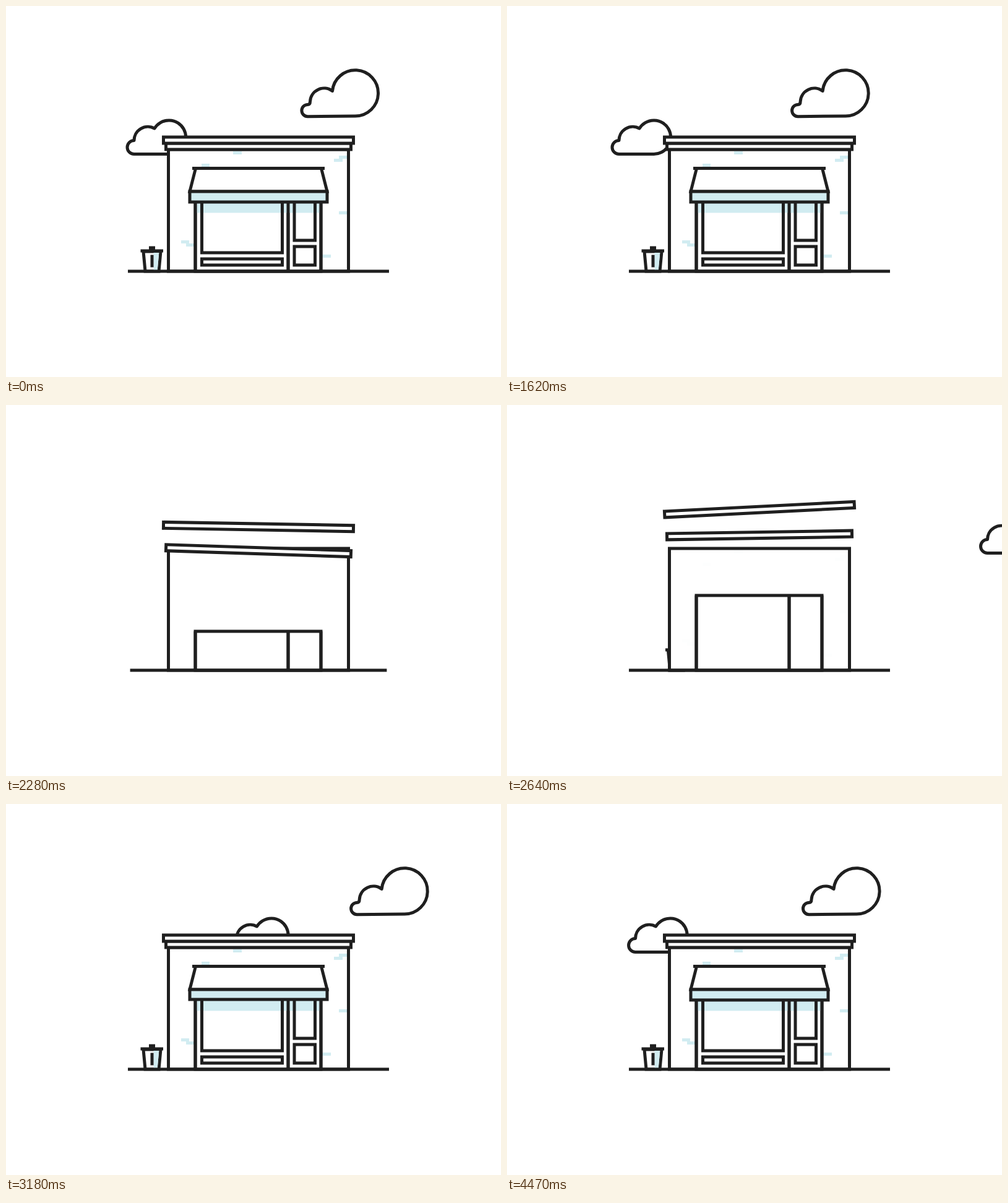
Write an HTML page that moves like this. It is 800 px wide and 600 px high and loops after 4.5 s.

```html
<!DOCTYPE html>
<html lang="en">
<head>
<meta charset="utf-8">
<title>Little shop</title>
<style>
html, body { margin: 0; width: 100%; height: 100%; overflow: hidden; background: #fff; }
svg { display: block; width: 100%; height: 100%; }
.ink { fill: #fff; stroke: #1f1f1f; stroke-width: 5; }
.solid { fill: #1f1f1f; }
.tint { fill: #d1ecf1; }
.open { fill: none; }
</style>
</head>
<body>
<svg viewBox="0 0 800 600">
  <g id="clouds" class="ink" stroke-linejoin="round">
    <path id="small" d="M263 239.5A27.3 27.3 0 1 0 240 198A22.3 22.3 0 0 0 207 217.5A11 11 0 0 0 207 239.5Z"/>
    <path id="big" d="M564.5 178A37.1 37.1 0 1 0 527.5 137.5A22.5 22.5 0 0 0 491.5 154.5Q491.5 159.5 487.5 159.5A9.6 9.6 0 0 0 487.5 178.7Z"/>
  </g>
  <g id="bin">
    <path class="ink" d="M222 397L225 429H247L250 397Z"/>
    <path class="tint" d="M238.5 399H247.3L244.8 427H238.5Z"/>
    <path class="solid" d="M233.5 402.5h5v20h-5zM217.5 393.5h36.5v5h-36.5zM231 388.5h10v6h-10z"/>
  </g>
  <rect id="wall" class="ink" x="262.5" width="291"/>
  <path id="bricks" stroke="#d1ecf1" stroke-width="5"
    d="M367 237.5h14M316 257.5h13M538 244.5h13M530 249.5h14M538 334.5h13M283 381.5h13M291 386.5h13M511.5 404.5h13.5"/>
  <rect id="bar2" class="ink" x="258.5" y="222" width="299" height="10"/>
  <rect id="bar1" class="ink" x="254.5" y="212" width="307" height="10"/>
  <path id="front" class="ink"/>
  <rect id="shade" class="tint" x="308.5" y="315" width="198"/>
  <g id="panes" class="ink open">
    <rect x="316.5" y="312" width="130" height="87"/>
    <rect x="316.5" y="409" width="130" height="10"/>
    <rect x="466" y="312" width="33.5" height="67"/>
    <rect x="466" y="389" width="33.5" height="30"/>
  </g>
  <path id="posts" class="ink open"/>
  <g class="ink">
    <path id="roof"/>
    <rect id="valance" x="297" width="222" style="fill:#d1ecf1"/>
    <path id="rail"/>
    <path id="ground"/>
  </g>
</svg>
<script>
const LOOP = 4500, STEP = 30, START = 1650, FLOOR = 429, GRAVITY = 0.00155;
const el = {};
document.querySelectorAll('[id]').forEach(e => el[e.id] = e);

const part = (t, a, b) => Math.min(1, Math.max(0, (t - a) / (b - a)));
const cubicOut = p => 1 - (1 - p) ** 3;
const sineOut = p => Math.sin(p * Math.PI / 2);
const sineInOut = p => (1 - Math.cos(p * Math.PI)) / 2;
const backOut = p => 1 + 2.7 * (p - 1) ** 3 + 1.7 * (p - 1) ** 2;
const set = (e, o) => { for (const k in o) e.setAttribute(k, o[k]); };
const show = (e, on) => set(e, { visibility: on ? 'visible' : 'hidden' });

for (const e of el.panes.children)
  set(e, { style: 'transform-box: fill-box; transform-origin: center' });

// Smooth curve through a few [time, value] keys, steepest at the start.
function glide(keys) {
  const d = keys.slice(1).map(([t, v], i) => (v - keys[i][1]) / (t - keys[i][0]));
  const m = d.map((s, i) => i ? 2 * d[i - 1] * s / (d[i - 1] + s) : 0);
  m[0] = 2 * d[0] - m[1];
  m.push(d[d.length - 1]);
  return t => {
    let i = 0;
    while (i < d.length - 1 && t > keys[i + 1][0]) i++;
    const [a, x] = keys[i], [b, y] = keys[i + 1];
    const h = b - a, u = (t - a) / h, v = 1 - u;
    return x * v + y * u + u * v * h * (v * (m[i] - d[i]) - u * (m[i + 1] - d[i]));
  };
}

const smallX = glide([[2640, 569.5], [3180, 165.5], [3780, 41.5], [4320, 4], [4500, 0], [6150, -26.5]]);
const bigX = glide([[2640, 340], [3180, 79.7], [3780, 19], [4500, 0], [5190, -9.5], [6150, -17.6]]);

// A roof bar is thrown up from the ground, turns slowly and lands on the wall.
function toss(e, t, { rest, top, peak, tilt, spin }) {
  const land = peak + Math.sqrt((rest - top) / GRAVITY);
  const y = top + GRAVITY * (Math.min(t, land) - peak) ** 2;
  const turn = (tilt + spin * (t - peak)) * part(t, 2050, 2250) * (1 - part(t, 2640, land));
  set(e, { transform: `translate(0 ${y - rest}) rotate(${turn} 408 ${rest})` });
  show(e, t > peak || y < 427);
}

function drawWall(t) {
  const half = 211 * cubicOut(part(t, START, 2498));
  set(el.ground, { d: `M${408 - half} ${FLOOR}H${408 + half}` });
  show(el.ground, half > 0);

  const wall = 197 * sineOut(part(t, 2055, 2260));
  set(el.wall, { y: FLOOR - wall, height: wall });
  show(el.wall, wall > 0);
  toss(el.bar1, t, { rest: 217, top: 131.9, peak: 2485, tilt: -1.22, spin: -0.0108 });
  toss(el.bar2, t, { rest: 227, top: 172.1, peak: 2482.6, tilt: 0.32, spin: -0.0078 });
  set(el.bricks, { opacity: part(t, 2630, 2930) });
}

function drawFront(t) {
  const h = 121 * sineInOut(part(t, 2167, 2387));
  set(el.front, { d: `M306 ${FLOOR}v${-h}h150v${h}zM456 ${FLOOR}v${-h}h53v${h}z` });
  set(el.posts, { d: [306, 456, 509].map(x => `M${x} ${FLOOR}v${-h}`).join('') });
  show(el.front, h > 0);
  show(el.posts, h > 0);

  const grow = cubicOut(part(t, 2660, 2960));
  for (const e of el.panes.children) e.style.transform = `scale(${grow})`;
  show(el.panes, grow > 0);
}

function drawAwning(t) {
  const rail = 107 * cubicOut(part(t, 2680, 2860));
  const drop = cubicOut(part(t, 2760, 3030));
  const skirt = 17 * cubicOut(part(t, 2900, 3350));
  const y = 262.5 + 37.5 * drop, flare = 9.5 * drop;
  set(el.rail, { d: `M${408 - rail} 262.5H${408 + rail}` });
  set(el.roof, { d: `M306.5 262.5L${306.5 - flare} ${y}H${509.5 + flare}L509.5 262.5Z` });
  set(el.valance, { y, height: skirt });
  set(el.shade, { height: 19.5 * cubicOut(part(t, 2930, 3150)) });
  show(el.rail, rail > 0);
  show(el.roof, drop > 0);
  show(el.valance, skirt > 0);
}

function draw(now) {
  let t = Math.floor((now % LOOP) / STEP) * STEP;
  if (t < START) t += LOOP;

  set(el.small, { transform: `translate(${smallX(t)} 0)` });
  set(el.big, { transform: `translate(${bigX(t)} 0)` });
  show(el.clouds, t > 2550);
  set(el.bin, { transform: `translate(${80 * (1 - backOut(part(t, 2580, 3030)))} 0)` });
  show(el.bin, t > 2580);
  drawWall(t);
  drawFront(t);
  drawAwning(t);
}

let begin = null;
function tick(now) {
  begin ??= now;
  draw(now - begin);
  requestAnimationFrame(tick);
}
draw(0);
requestAnimationFrame(tick);
</script>
</body>
</html>
```
